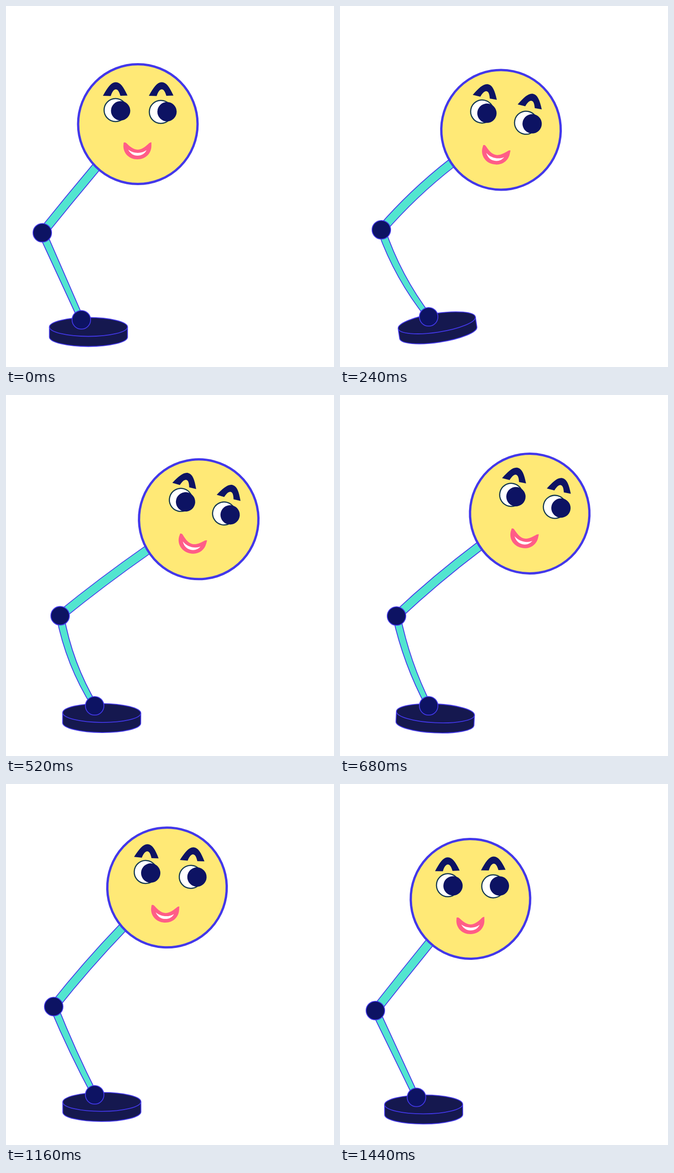
Recreate the animation shown at these times as an HTML page with a canvas. Size 714x784 px, loop 1.48 s.

```html
<!DOCTYPE html>
<html lang="en">
<head>
<meta charset="utf-8">
<title>Bouncing lamp</title>
<style>
  html, body { margin: 0; width: 100%; height: 100%; overflow: hidden; background: #fff; }
  canvas { display: block; width: 714px; height: 784px; }
</style>
</head>
<body>
<canvas id="stage" width="714" height="784"></canvas>
<script>
const ctx = document.getElementById('stage').getContext('2d');
const LOOP = 1480, STEP = 40;
const BLUE = '#4338ea', NAVY = '#0d1363', PLATE = '#15184f', TEAL = '#52e5cf';
const YELLOW = '#ffe976', PINK = '#ff5d87', RIM = '#163a50';

// foot x, y, tilt | lower arm bend | elbow x, y | head x, y, tilt
const REST = [164, 681.5, 0, 0, 79, 492.5, 287, 256.5, 0];
const UP = [193, 675, -5, -6, 73, 488, 258, 181, -11];
const LEAN = [193, 675, 2.7, 7, 123, 480, 413, 257.5, 13];
const KEYS = [
  [0, REST],
  [100, UP],
  [240, [193, 675, -8.6, 9, 90, 486, 350.5, 269, 12]],
  [400, [193, 675, -5.8, 16, 106, 477, 420.5, 308.5, 25]],
  [460, [193, 675, -3, 13, 112, 478, 424, 286, 19]],
  [560, [193, 675, 2, 8, 121, 480, 415.5, 262, 13.5]],
  [600, LEAN],
  [1040, LEAN],
  [1120, [193, 675, 1, 5, 112, 482, 382, 243, 9]],
  [1240, [193, 675, -3.4, -4, 84.5, 486.5, 278.3, 185.5, -8.5]],
  [1290, UP],
  [1440, [166.5, 680.5, -0.3, 0, 77, 492, 284, 249.5, -1]],
  [LOOP, REST]
];

const slope = (i, k) => (KEYS[i + 1][1][k] - KEYS[i][1][k]) / (KEYS[i + 1][0] - KEYS[i][0]);

// Monotone tangent: flat wherever a value turns round or rests
function tangent(i, k) {
  if (i === 0 || i === KEYS.length - 1) return 0;
  const a = slope(i - 1, k), b = slope(i, k);
  return a * b <= 0 ? 0 : 2 * a * b / (a + b);
}

function poseAt(t) {
  let i = 0;
  while (i < KEYS.length - 2 && t >= KEYS[i + 1][0]) i++;
  const [t0, p] = KEYS[i], [t1, q] = KEYS[i + 1];
  const d = t1 - t0, u = (t - t0) / d, s = u * u * (3 - 2 * u);
  return p.map((v, k) => v + (q[k] - v) * s
    + d * u * (1 - u) * ((1 - u) * tangent(i, k) - u * tangent(i + 1, k)));
}

const rad = deg => deg * Math.PI / 180;

function paint(path, fill, stroke, width = 1.8) {
  if (fill) { ctx.fillStyle = fill; ctx.fill(path); }
  if (stroke) { ctx.strokeStyle = stroke; ctx.lineWidth = width; ctx.stroke(path); }
}

function disc(x, y, r, fill, stroke, width) {
  const path = new Path2D();
  path.arc(x, y, r, 0, Math.PI * 2);
  paint(path, fill, stroke, width);
}

function placed(x, y, deg, draw) {
  ctx.save();
  ctx.translate(x, y);
  ctx.rotate(rad(deg));
  draw();
  ctx.restore();
}

const body = new Path2D('M-69.5 15.5A85 20.5 0 0 1 100.5 15.5V37.5A85 20.5 0 0 1 -69.5 37.5Z');
const lip = new Path2D('M-69.5 15.5A85 20.5 0 0 0 100.5 15.5');
const brow = new Path2D('M211 195C221 177 229 165.5 239 165.5C249 165.5 256 176 264.5 194.5L249 195C246 185 243 181 239 181C235 181 231 186 228 195.5Z');
const lips = new Path2D('M256 297Q258 295.500 261 297C268 303 276 312 287 312C297 312 306 303 312 297.500Q314 296 316.500 296V304C316.500 320 304 333 286 333C268 333 255.500 320 255.500 304Z');
const teeth = new Path2D('M266 312C278 321 295 321 306 313C302 321 295 325 286 325C278 325 271 321 266 312Z');

function foot() {
  paint(body, PLATE, BLUE);
  paint(lip, null, BLUE);
}

function lowerArm(ex, ey, fx, fy, bend) {
  const len = Math.hypot(fx - ex, fy - ey);
  const nx = (fy - ey) / len, ny = (ex - fx) / len;
  const cx = (ex + fx) / 2 - nx * bend * 2, cy = (ey + fy) / 2 - ny * bend * 2;
  const at = (x, y, w) => [x + nx * w, y + ny * w];
  const path = new Path2D();
  path.moveTo(...at(ex, ey, 8.3));
  path.quadraticCurveTo(...at(cx, cy, 7.2), ...at(fx, fy, 6));
  path.lineTo(...at(fx, fy, -6));
  path.quadraticCurveTo(...at(cx, cy, -7.2), ...at(ex, ey, -8.3));
  path.closePath();
  paint(path, TEAL, BLUE);
}

// Leaves the elbow and enters the head along the head's own axis
function upperArm(ex, ey, hx, hy, tilt) {
  const c = Math.cos(rad(tilt)), s = Math.sin(rad(tilt));
  const x = hx - 91 * c - 94 * s, y = hy - 91 * s + 94 * c;
  const dir = rad(tilt - 49.9), dx = Math.cos(dir), dy = Math.sin(dir);
  const half = Math.hypot(x - ex, y - ey) / 2;
  const path = new Path2D();
  path.moveTo(ex, ey);
  path.quadraticCurveTo(x - dx * half, y - dy * half, x, y);
  path.lineTo(x + dx * 20, y + dy * 20);
  paint(path, null, BLUE, 20.8);
  paint(path, null, TEAL, 17.4);
}

function eye(x, y, px, py) {
  disc(x, y, 25, '#fff', RIM, 2.5);
  disc(px, py, 21, NAVY);
}

function head() {
  disc(0, 0, 130, YELLOW, BLUE, 5);
  ctx.translate(-287, -256.5);
  eye(238.5, 226, 249.5, 227.5);
  eye(337, 230, 350.5, 229.5);
  paint(lips, PINK);
  paint(teeth, '#fff');
  paint(brow, NAVY);
  ctx.translate(100, 0);
  paint(brow, NAVY);
}

function draw(t) {
  const [fx, fy, footTilt, bend, ex, ey, hx, hy, tilt] = poseAt(t);
  ctx.fillStyle = '#fff';
  ctx.fillRect(0, 0, 714, 784);
  placed(fx, fy, footTilt, foot);
  lowerArm(ex, ey, fx, fy, bend);
  upperArm(ex, ey, hx, hy, tilt);
  disc(fx, fy, 20.2, NAVY, BLUE, 1.8);
  disc(ex, ey, 20.2, NAVY, BLUE, 1.8);
  placed(hx, hy, tilt, head);
}

const start = performance.now();
function tick() {
  const t = Math.max(0, performance.now() - start) % LOOP;
  draw(Math.floor(t / STEP) * STEP);
  requestAnimationFrame(tick);
}
tick();
</script>
</body>
</html>
```
